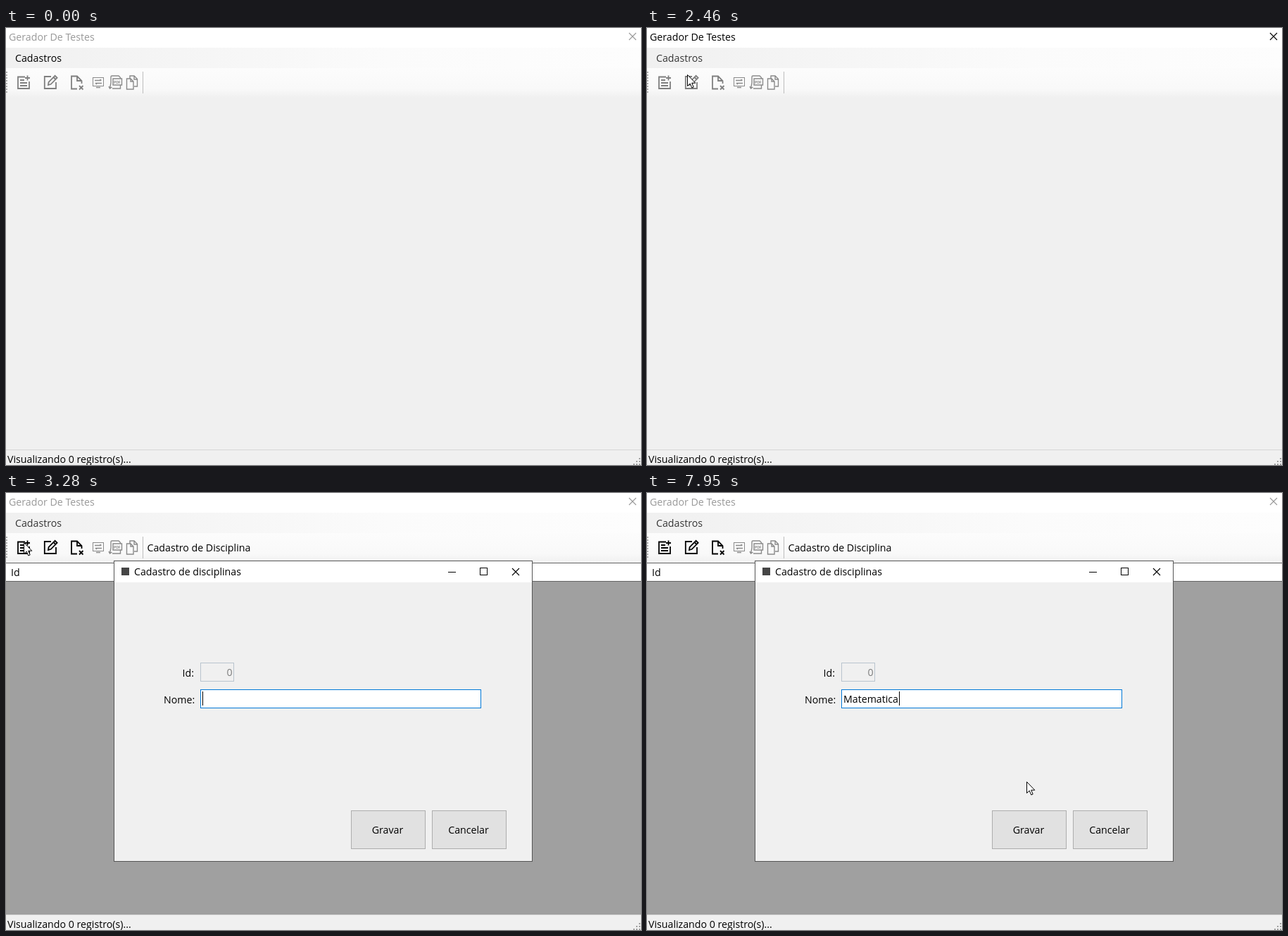
These frames come from a looping animation (902 px wide and 621 px high, 8 s). An HTML page:

```html
<!DOCTYPE html>
<html lang="pt-BR">
<head>
<meta charset="utf-8">
<title>Gerador De Testes</title>
<style>
html, body { margin: 0; width: 100%; height: 100%; overflow: hidden; background: #f0f0f0; }
svg { display: block; width: 902px; height: 621px; }
text { font: 14.2px "Open Sans", "Noto Sans", sans-serif; fill: #000; white-space: pre; }
rect, .crisp { shape-rendering: crispEdges; }
.icon { fill: none; stroke: currentColor; stroke-width: 1.8; }
.thin { stroke-width: 1.4; color: #8a8a8a; }
.line { fill: none; stroke: #000; stroke-width: 1.1; }
.hover { fill: #b3d7f3; stroke: #0078d7; }
.button { fill: #e1e1e1; stroke: #adadad; }
.mid { text-anchor: middle; }

/* One 8 s timeline: 1% = 80 ms */
.k { animation: 8s step-end infinite; }
.active { animation-name: active; }
.idle { animation-name: idle; }
.menu-hover { animation-name: menu-hover; }
.drop { animation-name: drop; }
.item-hover { animation-name: item-hover; }
.menu-text { animation-name: menu-text; }
.grid { animation-name: grid; }
.tools { animation-name: tools; }
.edit-hover { animation-name: edit-hover; }
.add-hover { animation-name: add-hover; }
.dialog { animation-name: dialog; }
.typing { animation-name: typing; }
.caret { animation-name: caret; }
.cursor { animation-name: move, pointer; }

@keyframes active { 0% { opacity: 0 } 12.25% { opacity: 1 } 37.625% { opacity: 0 } }
@keyframes idle { 0% { opacity: 1 } 12.25% { opacity: 0 } 37.625% { opacity: 1 } }
@keyframes menu-hover { 0% { opacity: 0 } 11.375% { opacity: 1 } 16.375% { opacity: 0 } }
@keyframes drop { 0% { opacity: 0 } 16.375% { opacity: 1 } 30.75% { opacity: 0 } }
@keyframes item-hover { 0% { opacity: 0 } 23.3% { opacity: 1 } }
@keyframes menu-text { 0% { opacity: 1 } 30.75% { opacity: .78 } }
@keyframes grid { 0% { opacity: 0 } 31.625% { opacity: 1 } }
@keyframes tools { 0% { color: #7f7f7f } 31.625% { color: #000 } }
@keyframes edit-hover { 0% { opacity: 0 } 31.625% { opacity: 1 } 34.1875% { opacity: 0 } }
@keyframes add-hover { 0% { opacity: 0 } 34.1875% { opacity: 1 } 36.75% { opacity: 0 } }
@keyframes dialog { 0% { opacity: 0 } 37.625% { opacity: 1 } }
@keyframes caret { 0% { opacity: 1 } 47.25% { opacity: 0 } 54.875% { opacity: 1 } }

/* The cover slides right by one letter per key press */
@keyframes typing {
  0% { transform: translateX(0) }
  54.875% { transform: translateX(13px) }
  62.375% { transform: translateX(21px) }
  65.75% { transform: translateX(26px) }
  66.625% { transform: translateX(34px) }
  71.625% { transform: translateX(47px) }
  73.25% { transform: translateX(55px) }
  77.375% { transform: translateX(60px) }
  78.375% { transform: translateX(64px) }
  80.875% { transform: translateX(71px) }
  87.5% { transform: translateX(64px) }
  89.125% { transform: translateX(71px) }
  90%, 100% { transform: translateX(79px) }
}

@keyframes pointer {
  0% { opacity: 0 } 1.625% { opacity: 1 } 55.75% { opacity: 0 } 94.125% { opacity: 1 }
}
@keyframes move {
  0% { transform: translate(696px, 530px) }
  1.625% { transform: translate(696px, 530px); animation-timing-function: steps(5) }
  6.0625% { transform: translate(300px, 235px); animation-timing-function: steps(6) }
  11.375% { transform: translate(52px, 41px) }
  18.75% { transform: translate(52px, 41px); animation-timing-function: steps(6) }
  25.625% { transform: translate(56px, 64px); animation-timing-function: steps(3) }
  29.875% { transform: translate(57px, 66px) }
  31.625% { transform: translate(57px, 72px) }
  32.5% { transform: translate(56px, 73px); animation-timing-function: steps(4) }
  35.875% { transform: translate(25px, 70px) }
  41.875% { transform: translate(25px, 70px); animation-timing-function: steps(5) }
  46.375% { transform: translate(330px, 222px); animation-timing-function: steps(3) }
  49% { transform: translate(346px, 210px) }
  94.125% { transform: translate(396px, 214px) }
  95% { transform: translate(436px, 222px) }
  95.875% { transform: translate(478px, 243px) }
  96.75% { transform: translate(505px, 272px) }
  97.625% { transform: translate(536px, 330px) }
  98.5% { transform: translate(544px, 385px) }
  99.375%, 100% { transform: translate(539px, 410px) }
}
</style>
</head>
<body>
<svg viewBox="0 0 902 621" xmlns="http://www.w3.org/2000/svg">
  <defs>
    <linearGradient id="strip">
      <stop offset="0" stop-color="#f0f0f0"/>
      <stop offset=".6" stop-color="#fbfbfb"/>
      <stop offset="1" stop-color="#fdfdfd"/>
    </linearGradient>
    <linearGradient id="bar" x2="0" y2="1">
      <stop offset="0" stop-color="#fcfcfc"/>
      <stop offset=".7" stop-color="#f9f9f9"/>
      <stop offset="1" stop-color="#f0f0f0"/>
    </linearGradient>
  </defs>

  <!-- Main window -->
  <rect width="902" height="621" fill="#f0f0f0"/>
  <rect width="902" height="28" fill="#fff"/>
  <g class="k idle">
    <text x="4" y="18" style="fill:#999">Gerador De Testes</text>
    <path class="line" style="stroke:#999" d="M885 7l10 10M895 7l-10 10"/>
  </g>
  <g class="k active">
    <text x="4" y="18">Gerador De Testes</text>
    <path class="line" d="M885 7l10 10M895 7l-10 10"/>
  </g>
  <rect y="28" width="902" height="29" fill="url(#strip)"/>
  <rect y="57" width="902" height="42" fill="url(#bar)"/>
  <rect class="k menu-hover hover" x="4.5" y="31.5" width="84" height="23"/>

  <!-- Toolbar -->
  <path class="crisp" d="M1 62v30" stroke="#b0b0b0" stroke-width="2" stroke-dasharray="2 2"/>
  <path class="crisp" d="M194.5 62v31" stroke="#bdbdbd"/>
  <rect class="k add-hover hover" x="6.5" y="58.5" width="37" height="38"/>
  <rect class="k edit-hover hover" x="43.5" y="58.5" width="37" height="38"/>
  <g class="k tools icon">
    <path d="M27 69.5H17V86H33V76M20 74h6M20 78h10M20 82h10M30.5 67.5v7M27 71h7"/>
    <path d="M64 69H54.8V86H71V77M60 81l.6-4.2 9-9 3 3-8.8 9zM67.5 70l3 3"/>
    <path d="M101 86.5H93V68.5H101L107.5 75V79M101 69V75H107M104 82l5.5 5.5M109.5 82l-5.5 5.5"/>
  </g>
  <g class="icon thin">
    <rect x="123.5" y="70.5" width="15" height="12" rx="1"/>
    <path d="M126 74.5h9M127 78.5h9M133.5 73l2 1.5M129 80l-2-1.5M128 84.5h6"/>
    <path d="M149 78V69.5Q149 68 150.5 68H160L162.5 70.5V72M152 72h12.5v9H152zM162.5 81v5H151M149 78l-1.5 8M146 83l1.500 3 3-2"/>
    <path d="M176 72V68H182L186.5 72.5V83H182M182 68v5h4.5M171.5 72H177L181 76V87H171.5zM177 72v4h4"/>
  </g>
  <text x="153" y="78.5" style="font-size:5px;font-weight:700;fill:#8a8a8a">PDF</text>

  <!-- Records -->
  <g class="k grid">
    <text x="200.5" y="83">Cadastro de Disciplina</text>
    <rect y="99" width="902" height="27" fill="#646464"/>
    <rect y="100" width="902" height="25" fill="#fff"/>
    <rect x="451" y="100" width="1" height="25" fill="#646464"/>
    <rect y="126" width="902" height="473" fill="#a0a0a0"/>
    <text x="7" y="118">Id</text>
    <text x="460" y="118">Disciplina</text>
  </g>

  <!-- Status bar -->
  <rect y="599" width="902" height="1" fill="#d7d7d7"/>
  <text x="2" y="618">Visualizando 0 registro(s)...</text>
  <path class="crisp" d="M900 611v10M896 615v6M892 619v2" stroke="#a0a0a0" stroke-width="2" stroke-dasharray="2 2"/>

  <!-- Menu -->
  <g class="k drop">
    <rect x="4.5" y="31.5" width="84" height="25" fill="#f8f8f8" stroke="#a0a0a0"/>
    <rect x="4.5" y="56.5" width="196" height="96" fill="#fdfdfd" stroke="#a0a0a0"/>
    <rect x="5" y="57" width="27" height="95" fill="#f4f4f4"/>
    <rect class="k item-hover hover" x="6.5" y="58.5" width="192" height="22"/>
    <text x="38" y="75">Disciplina</text>
    <text x="38" y="98">Matéria</text>
    <text x="38" y="121">Questão</text>
    <text x="38" y="144">Teste</text>
  </g>
  <text class="k menu-text" x="13" y="48">Cadastros</text>

  <!-- Dialog -->
  <g class="k dialog">
    <rect x="153.5" y="96.5" width="594" height="427" fill="#f0f0f0" stroke="#555"/>
    <rect x="154" y="97" width="593" height="30" fill="#fff"/>
    <rect x="164" y="106" width="11" height="11" fill="#454545"/>
    <text x="182" y="117">Cadastro de disciplinas</text>
    <path class="line crisp" d="M628 112.5h11M673.5 106.5h10v10h-10z"/>
    <path class="line" d="M719 107l10 10M729 107l-10 10"/>
    <text x="250.5" y="261">Id:</text>
    <rect x="276.5" y="241.5" width="47" height="26" fill="#f0f0f0" stroke="#b9c4ce"/>
    <text x="321.5" y="260" text-anchor="end" style="fill:#7d7d7d">0</text>
    <text x="224" y="299">Nome:</text>
    <rect x="276.5" y="279.5" width="398" height="26" fill="#fff" stroke="#0078d7"/>
    <text x="279" y="298">Matematica</text>
    <g class="k typing">
      <rect x="279" y="281" width="85" height="23" fill="#fff"/>
      <rect class="k caret" x="279" y="282" width="1" height="20"/>
    </g>
    <rect class="button" x="490.5" y="451.5" width="105" height="54"/>
    <rect class="button" x="605.5" y="451.5" width="105" height="54"/>
    <text class="mid" x="542" y="484">Gravar</text>
    <text class="mid" x="657" y="484">Cancelar</text>
  </g>

  <path class="k cursor" d="M.5 .5V16.500L4.2 13 6.8 19 9.2 18 6.7 12.2H11.8Z" fill="#fff" stroke="#000"/>
</svg>
</body>
</html>
```
